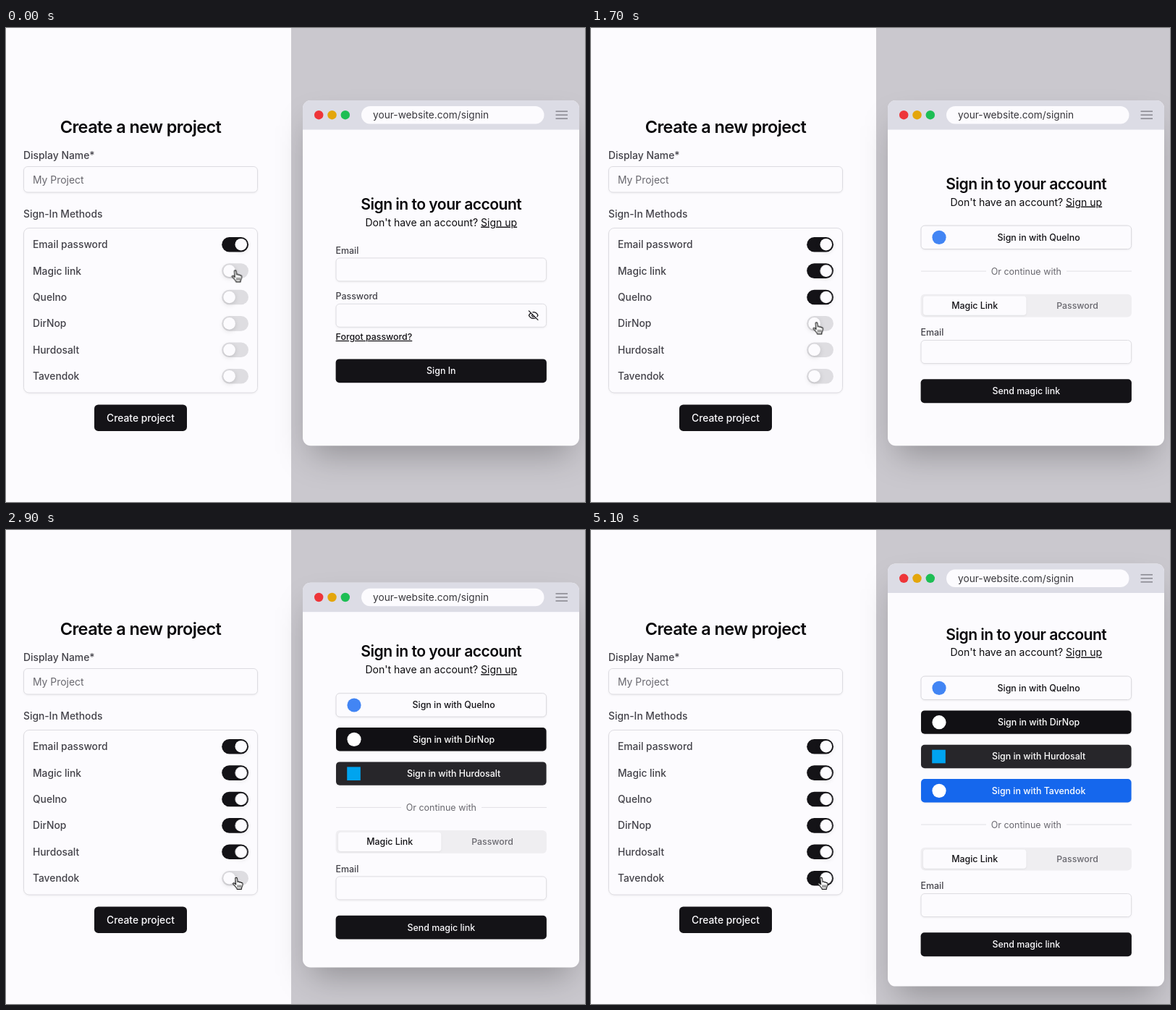
Write an HTML page that moves like this. It is 800 px wide and 655 px high and loops after 5200 ms.

```html
<!DOCTYPE html>
<html lang="en">
<head>
<meta charset="utf-8">
<title>Create a new project</title>
<style>
  html, body { margin: 0; width: 100%; height: 100%; overflow: hidden; background: #fcfbfe; }
  svg { display: block; width: 800px; height: 655px; }
  text { font-family: Inter, "Noto Sans", sans-serif; font-optical-sizing: none; white-space: pre; }
  .title { font-weight: 600; letter-spacing: -.025em; }
  .u { text-decoration: underline; }
  .soft { filter: drop-shadow(0 1px 1px rgba(0, 0, 0, .06)); }
  .knob { filter: drop-shadow(0 2px 3px rgba(0, 0, 0, .14)); }
  .shade { filter: blur(23px); }
  .view, .hand, .track, .slide { animation: 5200ms linear infinite; }
  .view { animation-timing-function: step-end; }
</style>
</head>
<body>
<script>
const LOOP = 5200;
const INK = '#141317', GREY = '#434249', MUTED = '#69686f', PAPER = '#fcfbfe', LINE = '#dddce1';
const clicks = [370, 1070, 1770, 2370, 2970];
const methods = ['Email password', 'Magic link', 'Quelno', 'DirNop', 'Hurdosalt', 'Tavendok'];
const providers = [
  { bg: PAPER, ink: INK, mark: '#4285f4' },
  { bg: '#111014', ink: '#fff', mark: '#fff' },
  { bg: '#27262a', ink: '#fff', mark: '#00a4ef', square: true },
  { bg: '#1567ed', ink: '#fff', mark: '#fff' }
];
const pct = ms => (ms / LOOP * 100).toFixed(3) + '%';

// y is the middle of the capitals
const text = (x, y, str, size, fill = INK, weight = 500, anchor = 'start', cls = '') =>
  `<text x="${x}" y="${y + size * .36}" font-size="${size}" fill="${fill}" font-weight="${weight}" text-anchor="${anchor}" class="${cls}">${str}</text>`;
const mid = (x, y, str, size, fill, weight, cls) => text(x, y, str, size, fill, weight, 'middle', cls);
const box = (x, y, w, h, r, fill, more = '') =>
  `<rect x="${x}" y="${y}" width="${w}" height="${h}" rx="${r}" fill="${fill}" ${more}/>`;
const outline = `stroke="${LINE}" class="soft"`;
const hline = (x1, x2, y, color, w = 1) =>
  `<path d="M${x1} ${y}H${x2}" stroke="${color}" stroke-width="${w}"/>`;

const toggle = i => {
  const y = 299.2 + 36.4 * i;
  const anim = name => i ? `style="animation-name:${name}${i}"` : '';
  return text(37, y, methods[i], 13.8, GREY) +
    box(298.2, y - 10.3, 36.8, 20.6, 10.3, i ? '#dedde1' : INK, `class="track" ${anim('track')}`) +
    `<g class="slide" ${anim('slide')}><circle class="knob" cx="${i ? 308.6 : 324.8}" cy="${y}" r="8.3" fill="${PAPER}"/></g>`;
};

const form = () =>
  mid(186, 136.8, 'Create a new project', 23.5, '#09080b', 600, 'title') +
  text(24, 176, 'Display Name*', 13.9, GREY) +
  box(24.5, 191.5, 323, 35.5, 5.5, PAPER, outline) +
  text(37, 209.6, 'My Project', 13.9, MUTED, 400) +
  text(24, 257, 'Sign-In Methods', 13.8, GREY) +
  box(24.5, 276.5, 323, 227.5, 7.5, PAPER, outline) +
  methods.map((m, i) => toggle(i)).join('') +
  box(122, 520.5, 128, 36.4, 5.5, INK) +
  mid(186, 538.6, 'Create project', 13.8, PAPER);

const chrome = (top, height) =>
  box(421, top + 34, 360, height - 22, 8, 'rgba(0,0,0,.28)', 'class="shade"') +
  box(410, top, 382, height, 11, PAPER) +
  `<path d="M410 ${top + 40.4}v-29.4a11 11 0 0 1 11-11h360a11 11 0 0 1 11 11v29.4z" fill="#dcdce5"/>` +
  ['#ee3539', '#e4a60b', '#1dbe54'].map((c, i) =>
    `<circle cx="${432.2 + 18.3 * i}" cy="${top + 20.2}" r="6.2" fill="${c}"/>`).join('') +
  box(491, top + 8, 252.5, 24.5, 12.2, PAPER) +
  text(507, top + 20.4, 'your-website.com/signin', 13.7, '#38373c', 400) +
  [15.2, 20.2, 25.2].map(d => hline(759.5, 776, top + d, '#8f8e96', 1.7)).join('');

const field = (label, y) =>
  text(455.6, y, label, 12.4, GREY) + box(456, y + 10.7, 290.6, 32, 5, PAPER, outline);
const action = (label, y) =>
  box(455.6, y, 291.3, 32.8, 5, INK) + mid(601.3, y + 16.4, label, 12.4, PAPER);

const provider = (p, i, y) =>
  box(456, y, 290.6, 32.4, 5, p.bg, i ? 'class="soft"' : 'stroke="#d9d8dd" class="soft"') +
  (p.square ? box(471.2, y + 7, 18.6, 18.6, 0, p.mark)
            : `<circle cx="481" cy="${y + 16.3}" r="9.6" fill="${p.mark}"/>`) +
  mid(618.6, y + 16.3, 'Sign in with ' + methods[i + 2], 12.4, p.ink);

const heading = y =>
  mid(601.3, y, 'Sign in to your account', 21.1, '#09080b', 600, 'title') +
  mid(601.3, y + 25.3, 'Don\'t have an account? <tspan class="u">Sign up</tspan>', 14, '#0d0c0f', 400);

const passwordForm = y =>
  heading(y) + field('Email', y + 64) + field('Password', y + 127.4) +
  `<g transform="translate(721.2 ${y + 146.4}) scale(.625)" fill="none" stroke="${INK}" stroke-width="2" stroke-linecap="round">
    <path d="M9.9 9.9a3 3 0 1 0 4.2 4.2M10.7 5.1A10.4 10.4 0 0 1 12 5c7 0 10 7 10 7a13 13 0 0 1-1.7 2.7M6.6 6.6A13.5 13.5 0 0 0 2 12s3 7 10 7a9.7 9.7 0 0 0 5.4-1.6M2 2l20 20"/></g>` +
  text(455.6, y + 183.2, 'Forgot password?', 12.35, INK, 500, 'start', 'u') +
  action('Sign In', y + 214.2);

const linkForm = n => {
  const gap = 47.34, y = 262.5 - gap / 2 * (n ? n + 1 : 0);
  const tabs = y + 57.8 + gap * (n ? n + 1 : 0), or = tabs - 31.6;
  return heading(y) +
    providers.slice(0, n).map((p, i) => provider(p, i, y + 57.9 + gap * i)).join('') +
    (n ? hline(456, 546, or, '#e1e0e5') + hline(657, 747, or, '#e1e0e5') +
      mid(601.3, or, 'Or continue with', 12.5, MUTED, 400) : '') +
    box(455.6, tabs, 291.3, 31.8, 5.5, '#efeef1') +
    box(459, tabs + 2.8, 142.4, 26.2, 4, PAPER, 'class="soft"') +
    mid(530.2, tabs + 15.9, 'Magic Link', 12.4) +
    mid(672, tabs + 15.9, 'Password', 12.3, MUTED) +
    field('Email', tabs + 53.2) + action('Send magic link', tabs + 117.7);
};

const view = i => {
  const top = [100, 100, 100, 99, 72.8, 46.6][i];
  return `<g class="view" style="animation-name:view${i}">` +
    chrome(top, 2 * (338.6 - top)) + (i ? linkForm(i - 1) : passwordForm(243.2)) + '</g>';
};

// pointer stops: x, y, arrival, departure
const stops = [[319, 343, 0, 520], [317, 379.5, 880, 1200], [313.8, 415, 1580, 1900],
  [318.3, 452.5, 2200, 2480], [320.3, 488.5, 2780, LOOP]];
const at = ([x, y]) => `transform:translate(${x - 7.5}px,${y - 8.5}px)`;

const css = () => {
  let out = '@keyframes hand{' + stops.map(s =>
    `${pct(s[2])}{${at(s)}}${pct(s[3])}{${at(s)};animation-timing-function:ease-in-out}`).join('') + '}';
  clicks.forEach((c, k) => {
    const i = k + 1, a = pct(c), b = pct(c + 150), ease = 'animation-timing-function:ease-in-out';
    out += `@keyframes track${i}{0%,${a}{fill:#dedde1;${ease}}${b},to{fill:${INK}}}` +
      `@keyframes slide${i}{0%,${a}{transform:none;${ease}}${b},to{transform:translateX(16.2px)}}`;
  });
  const cuts = [0, ...clicks, LOOP];
  for (let i = 0; i < 6; i++) {
    out += `@keyframes view${i}{` + (i ? '0%{visibility:hidden}' : '') +
      `${pct(cuts[i])}{visibility:visible}` +
      (i < 5 ? `${pct(cuts[i + 1])},to{visibility:hidden}` : 'to{visibility:visible}') + '}';
  }
  return out;
};

const hand = `<g class="hand" style="animation-name:hand" stroke="#111" stroke-linejoin="round" stroke-linecap="round">
  <path fill="#fff" stroke-width="1.1" d="M4 1.7C4 0 6.4 0 6.6 1.7L7.2 6.4C7.6 5.4 9.4 5.6 9.6 6.9C10.2 6.1 11.8 6.4 12 7.7C12.7 7.1 14.2 7.6 14.2 9C14.2 12 13.6 12.4 12.6 14.4L12.5 16.4H6.4C6.2 14.6 3.6 12.2 1.2 9.6C.2 8.4 1.6 7.2 2.9 8.2L4.8 10Z"/>
  <path fill="none" stroke-width=".8" d="M7.4 10.8v3M9.4 10.8v3M11.4 10.8v3"/></g>`;

document.body.innerHTML = `<style>${css()}</style>
<svg viewBox="0 0 800 655">` +
  box(0, 0, 800, 655, 0, PAPER) + box(394, 0, 406, 655, 0, '#cac8ce') +
  [0, 1, 2, 3, 4, 5].map(view).join('') + form() + hand + '</svg>';
</script>
</body>
</html>
```
